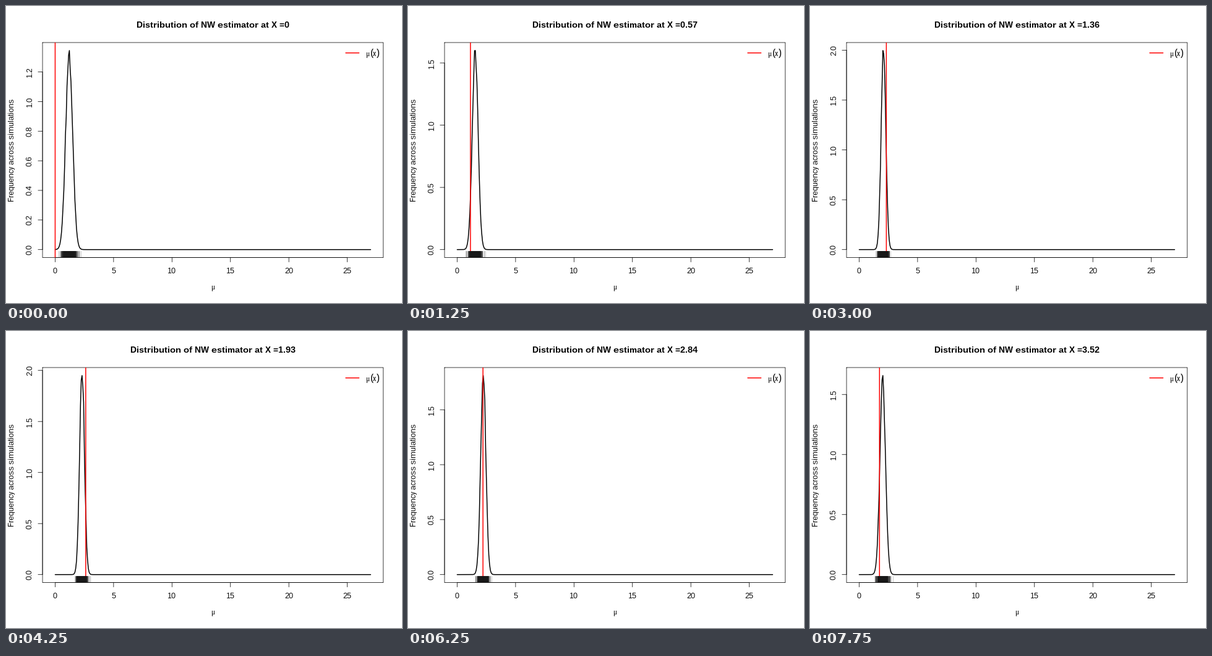
These frames come from a looping animation (640 px wide and 480 px high, 8000 ms). A matplotlib script:

```python
import numpy as np
import matplotlib.pyplot as plt
from matplotlib.animation import FuncAnimation
from matplotlib.collections import LineCollection

# Whole-pixel glyph advances, as in a hinted plot device
plt.rcParams.update({"text.hinting": "native", "text.hinting_factor": 1})

W, H, DPI = 640, 480, 80
PT = 72 / DPI                      # points per pixel
FRAMES, INTERVAL = 32, 250
X_STEP = 0.11345

# Plot region in pixels, with a 4% margin around the data
LEFT, RIGHT, TOP, BOTTOM = 59.04, 609.76, 59.04, 406.56
MID_X, MID_Y = (LEFT + RIGHT) / 2, (TOP + BOTTOM) / 2
X0 = LEFT + (RIGHT - LEFT) / 27
X_UNIT = (RIGHT - LEFT) / 1.08 / 27
Y0 = BOTTOM - (BOTTOM - TOP) / 27
Y_SPAN = (BOTTOM - TOP) / 1.08
GRID = np.linspace(0, 27, 400)


def px(value):
    return X0 + value * X_UNIT


def true_mean(x):
    return 2 * np.sin(x) + 0.2 * x ** 2


def centre_at(x):
    """Smoothed mean that the estimates gather around."""
    return 1.2 + 0.4 * x + 0.503 * x**2 - 0.286 * x**3 + 0.0368 * x**4


def peak_at(i):
    """Highest density: rises quickly, then sinks slowly."""
    return np.interp(i, [0, 5, 12, 21, 31], [1.345, 1.6, 1.997, 1.913, 1.659])


def density(centre, spread, rng):
    """Slightly rough bell on GRID, scaled to a peak of one."""
    bell = np.exp(-((GRID - centre) / spread) ** 2 / 2)
    rough = bell * (1 + rng.normal(0, 0.025, GRID.size))
    return rough / rough.max()


fig = plt.figure(figsize=(W / DPI, H / DPI), dpi=DPI, facecolor="white")
ax = fig.add_axes([0, 0, 1, 1])
ax.set_xlim(0, W)
ax.set_ylim(H, 0)
ax.axis("off")


def line(xs, ys, color="black", width=0.75, z=2):
    return ax.plot(xs, ys, color=color, lw=width * PT, snap=False, zorder=z,
                   solid_capstyle="round", solid_joinstyle="round")[0]


def text(x, y, s, size=12, **kw):
    kw = {"family": "Liberation Sans", "ha": "center", **kw}
    return ax.text(x, y, s, fontsize=size * PT, va="baseline",
                   rotation_mode="anchor", **kw)


def draw_static():
    line([LEFT, RIGHT, RIGHT, LEFT, LEFT], [TOP, TOP, BOTTOM, BOTTOM, TOP])
    line([px(0), px(25)], [BOTTOM, BOTTOM])
    for v in range(0, 26, 5):
        line([px(v)] * 2, [BOTTOM, BOTTOM + 7.2])
        text(px(v), 432, str(v))
    text(MID_X, 458, "μ", family="Liberation Serif")
    text(13, MID_Y, "Frequency across simulations", rotation=90)

    line([549, 570.6], [75.8, 75.8], "red", 1.5)
    text(581, 81, "μ", ha="left", family="Liberation Serif")
    text(588, 81, "(", 16, ha="left")
    text(593, 81, "x", ha="left")
    text(599, 81, ")", 16, ha="left")


draw_static()
title = text(MID_X, 35, "", 14.4, weight="bold")
curve = line([], [], width=1.5, z=3)
marker = line([], [], "red", 1.5, z=4)
marker.set_solid_capstyle("butt")
rug = LineCollection([], colors="#181818", alpha=0.6,
                     linewidths=0.375 * PT, zorder=5)
rug.set_snap(False)
ax.add_collection(rug, autolim=False)
y_axis = []


def draw_y_axis(peak):
    while y_axis:
        y_axis.pop().remove()
    step = 0.5 if peak > 1.44 else 0.2
    count = int(1.04 * peak / step + 1e-9)
    ys = [Y0 - k * step / peak * Y_SPAN for k in range(count + 1)]
    y_axis.append(line([LEFT, LEFT], [ys[0], ys[-1]]))
    for k, y in enumerate(ys):
        y_axis.append(line([LEFT - 7.2, LEFT], [y, y]))
        y_axis.append(text(42, y, f"{k * step:.1f}", rotation=90))


def update(i):
    rng = np.random.default_rng(100 + i)
    x = i * X_STEP
    centre, peak = centre_at(x), peak_at(i)
    spread = 1 / (peak * np.sqrt(2 * np.pi))    # unit area under the bell

    title.set_text(f"Distribution of NW estimator at X ={round(x, 2):g}")
    curve.set_data(px(GRID), Y0 - density(centre, spread, rng) * Y_SPAN)
    marker.set_data([px(true_mean(x))] * 2, [TOP, BOTTOM])
    samples = px(rng.normal(centre, spread, 1000))
    rug.set_segments([[(s, BOTTOM), (s, BOTTOM - 10.43)] for s in samples])
    draw_y_axis(peak)
    return []


anim = FuncAnimation(fig, update, frames=FRAMES, interval=INTERVAL,
                     init_func=lambda: [], repeat=True, repeat_delay=0)
plt.show()
```
